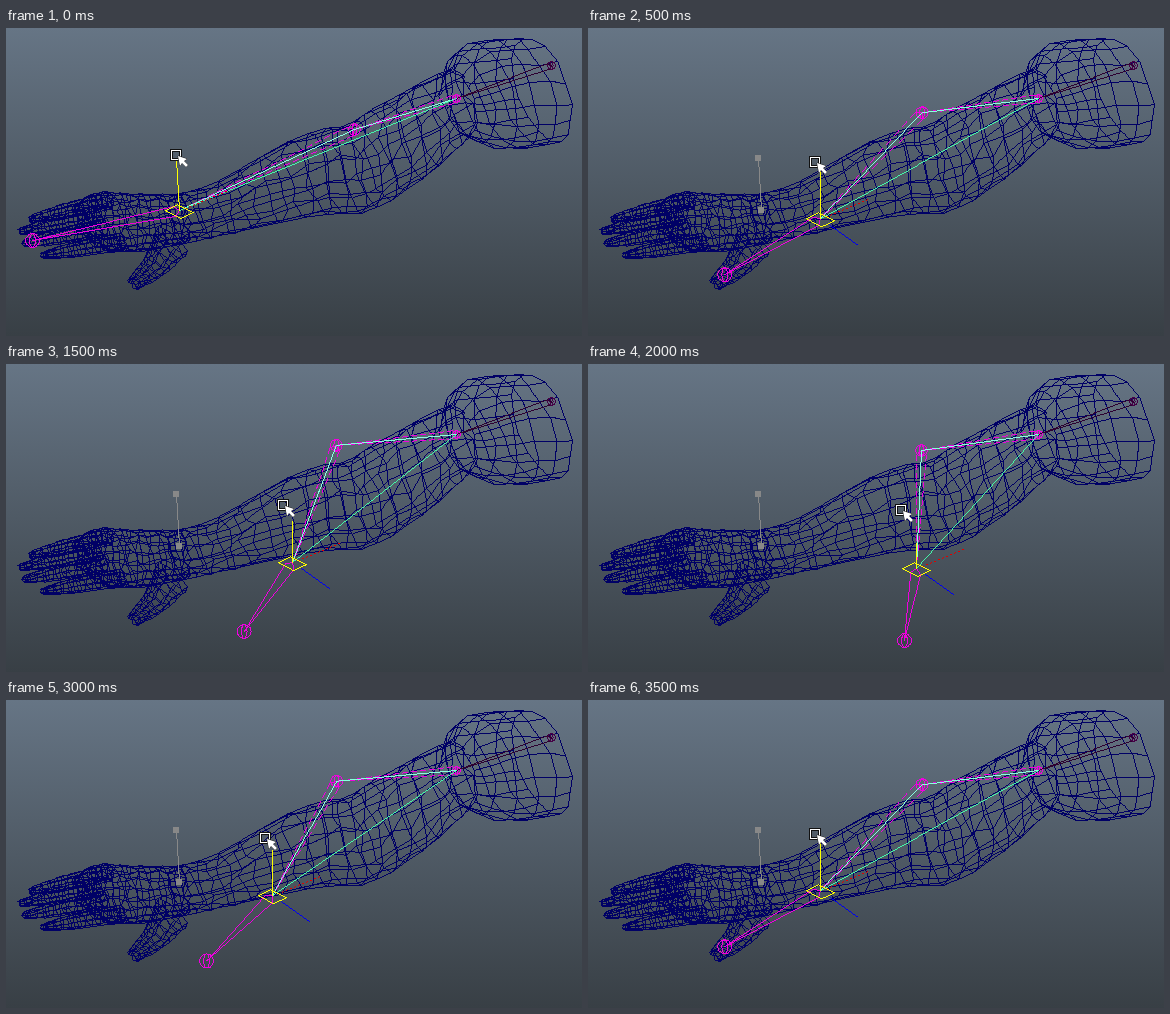
These frames come from a looping animation (576x308 px, 4000 ms). An HTML page with a canvas:

```html
<!DOCTYPE html>
<html lang="en">
<head>
<meta charset="utf-8">
<title>Arm rig</title>
<style>
  html, body { margin: 0; width: 576px; height: 308px; overflow: hidden; }
  canvas { display: block; }
</style>
</head>
<body>
<canvas id="stage" width="576" height="308"></canvas>
<script>
const stage = document.getElementById('stage');
const backdrop = document.createElement('canvas');
backdrop.width = stage.width;
backdrop.height = stage.height;
let ctx = backdrop.getContext('2d');

const add = (p, x, y) => [p[0] + x, p[1] + y];

// Pixel line without antialiasing; dash = [on, period]
function line(a, b, color, dash = [1, 1]) {
  const dx = b[0] - a[0], dy = b[1] - a[1];
  const n = Math.max(1, Math.ceil(Math.max(Math.abs(dx), Math.abs(dy))));
  ctx.fillStyle = color;
  for (let i = 0; i <= n; i++) {
    if (i % dash[1] < dash[0]) {
      ctx.fillRect(Math.round(a[0] + dx * i / n), Math.round(a[1] + dy * i / n), 1, 1);
    }
  }
}

function loop(points, color) {
  points.forEach((p, i) => line(p, points[(i + 1) % points.length], color));
}

let seed = 7;
function jitter(size) {
  seed = (seed * 16807) % 2147483647;
  return (seed / 2147483647 - 0.5) * size;
}

// Smooth value through the keys (Catmull-Rom), t counted in keys
function spline(keys, t, axis) {
  const k = Math.min(Math.floor(t), keys.length - 2), f = t - k;
  const at = i => keys[Math.max(0, Math.min(keys.length - 1, i))][axis];
  const [a, b, c, d] = [at(k - 1), at(k), at(k + 1), at(k + 2)];
  return b + f / 2 * (c - a + f * (2 * a - 5 * b + 4 * c - d + f * (3 * (b - c) + d - a)));
}

// Wire tube along keys [x, y, radius]; rings lean by an angle and open by depth
function tube(keys, { rings, sides, lean, depth, rough }) {
  const color = '#000066';
  const sin = Math.sin(lean), cos = Math.cos(lean);
  let last;
  for (let i = 0; i <= rings; i++) {
    const [x, y, r] = [0, 1, 2].map(axis => spline(keys, i / rings * (keys.length - 1), axis));
    const ring = Array.from({ length: sides }, (_, j) => {
      const angle = j * 2 * Math.PI / sides;
      const along = r * Math.cos(angle), across = r * depth * Math.sin(angle);
      const wobble = rough * (0.3 + Math.abs(Math.sin(angle)));
      return [x + along * sin + across * cos + jitter(wobble),
              y + along * cos - across * sin + jitter(wobble)];
    });
    loop(ring, color);
    if (last) ring.forEach((p, j) => line(last[j], p, color));
    last = ring;
  }
}

function drawBackdrop() {
  const shade = ctx.createLinearGradient(0, 0, 0, 308);
  shade.addColorStop(0, '#667585');
  shade.addColorStop(1, '#383f45');
  ctx.fillStyle = shade;
  ctx.fillRect(0, 0, 576, 308);

  // Shoulder, arm, palm, thumb
  tube([[452, 75, 34], [474, 68, 54], [507, 65, 57], [535, 62, 55]],
    { rings: 5, sides: 16, lean: 0.35, depth: 0.45, rough: 4 });
  tube([[174, 190, 25], [222, 178, 27], [300, 148, 41], [354, 138, 45], [401, 110, 45], [454, 74, 35]],
    { rings: 16, sides: 14, lean: 0.24, depth: 0.25, rough: 8 });
  tube([[72, 190, 14], [95, 193, 29], [130, 194, 29], [176, 190, 25]],
    { rings: 15, sides: 18, lean: 0.15, depth: 0.25, rough: 5 });
  tube([[126, 256, 7], [145, 240, 12], [166, 212, 20]],
    { rings: 9, sides: 11, lean: 0.8, depth: 0.25, rough: 3 });

  for (let i = 0; i < 4; i++) {
    const x = 13 + 7 * (i - 1.2) ** 2, y = 191 + 12 * i, slope = -0.24 + 0.02 * i;
    const key = (reach, r) => [x + reach, y + slope * reach, r];
    tube([key(0, 3), key(25, 7), key(50, 8), key(80, 9)],
      { rings: 11, sides: 9, lean: 0.2, depth: 0.3, rough: 2 });
  }
}

const MAGENTA = '#f000e0', YELLOW = '#ffff00', CYAN = '#88ffe0';
const shoulder = [450, 70], root = [545, 37];

function joint(p, r, color) {
  for (const rx of [r, r * 0.4]) {
    loop(Array.from({ length: 12 }, (_, i) => {
      const angle = i * Math.PI / 6;
      return add(p, rx * Math.cos(angle), r * Math.sin(angle));
    }), color);
  }
}

function bone(a, b, r, color, dash) {
  const angle = Math.atan2(b[1] - a[1], b[0] - a[0]);
  const ux = r * Math.cos(angle), uy = r * Math.sin(angle);
  for (const side of [-1, 1]) {
    const base = add(a, ux - uy * side, uy + ux * side);
    line(a, base, color);
    line(base, b, color, dash);
  }
}

function drawCursor([x, y]) {
  ctx.lineWidth = 1;
  for (const [size, color] of [[11, '#111'], [7, '#111'], [9, '#fff']]) {
    ctx.strokeStyle = color;
    ctx.strokeRect(x - size / 2, y - size / 2, size, size);
  }
  ctx.beginPath();
  for (const [u, v] of [[2, 1], [11, 4], [8, 6], [12, 10], [10, 12], [6, 8], [4, 11]]) {
    ctx.lineTo(x + u, y + v);
  }
  ctx.closePath();
  ctx.strokeStyle = '#222';
  ctx.stroke();
  ctx.fillStyle = '#fff';
  ctx.fill();
}

// u runs from 0 (stretched arm) to 1 (fully bent)
function drawPose(u) {
  const wrist = [173 + 155 * u, 182 + 22 * u];
  const hand = add(wrist, -147 + 135 * u, 30 + 42 * u * (2 - u));
  const elbow = [348 - 52 * u + 37 * u * u, 101 - 62 * u + 47 * u * u];
  const cursor = add(wrist, -3 - 12 * u * u, -55 - 3 * u).map(Math.round);
  const stem = 51 - 26 * u ** 3;

  ctx.drawImage(backdrop, 0, 0);
  if (u) {
    line([170, 130], [173, 182], '#888');
    ctx.fillRect(167, 127, 6, 6);
    ctx.fillRect(170, 179, 6, 6);
  }
  bone(root, shoulder, 3, '#2d0030');
  joint(root, 4, '#450045');
  bone(shoulder, elbow, 4, MAGENTA, [6, 9]);
  bone(elbow, wrist, 5, MAGENTA, [6, 9]);
  bone(wrist, hand, 5, MAGENTA);
  joint(shoulder, 4, MAGENTA);
  joint(elbow, 6, MAGENTA);
  joint(hand, 7, MAGENTA);

  line(shoulder, elbow, CYAN);
  line(elbow, wrist, CYAN);
  line(shoulder, wrist, '#44f5a8');

  line(add(wrist, 6, -2), add(wrist, 47, -19), '#e00000', [2, 4]);
  if (u) line(add(wrist, 9, 6), add(wrist, 37, 26), '#0000ee');
  line(wrist, add(wrist, u ? 0 : -3, -stem), YELLOW);
  loop([[-14, 0], [-2, -6], [14, 2], [1, 8]].map(([x, y]) => add(wrist, x, y)), YELLOW);
  drawCursor(cursor);
}

drawBackdrop();
ctx = stage.getContext('2d');

const bends = [0, 0.38, 0.6, 0.73, 1];
function frame(now) {
  const step = Math.floor(now / 500) % 8;
  drawPose(bends[Math.min(step, 8 - step)]);
  requestAnimationFrame(frame);
}
frame(performance.now());
</script>
</body>
</html>
```
